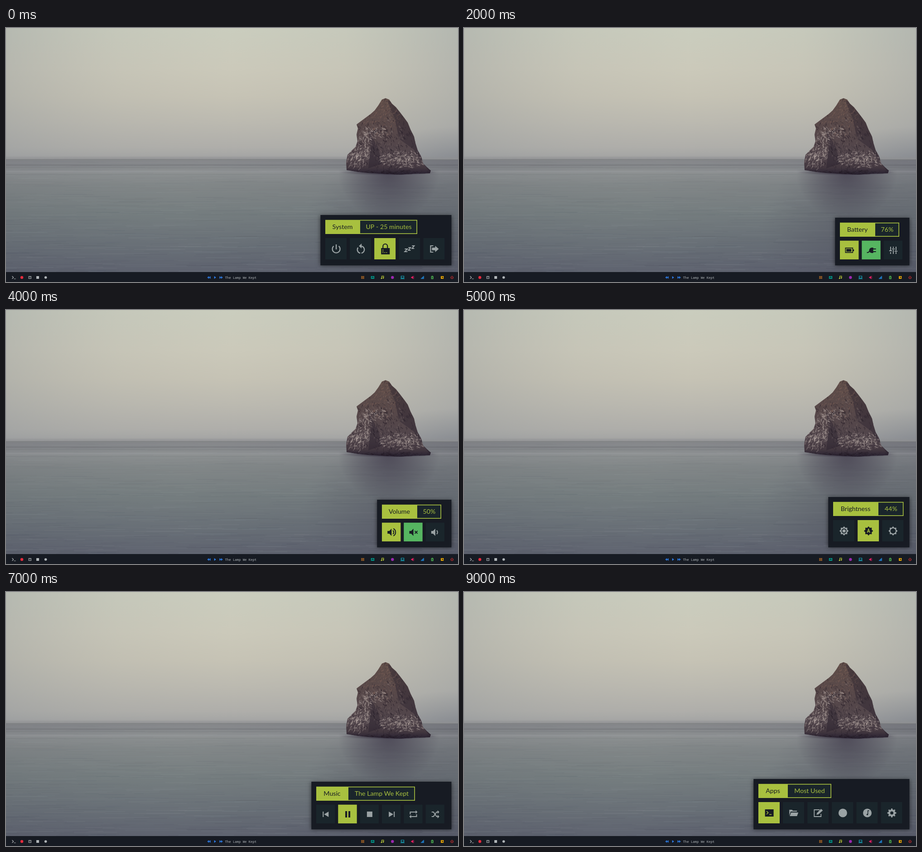
Recreate the animation shown at these times as an HTML page with a canvas. Size 998 px wide and 561 px high, loop 10000 ms.

```html
<!DOCTYPE html>
<html lang="en">
<head>
<meta charset="utf-8">
<title>Desktop applets</title>
<style>
html, body { margin: 0; width: 100%; height: 100%; overflow: hidden; background: #171b24; }
canvas { display: block; }
</style>
</head>
<body>
<canvas id="stage" width="998" height="561"></canvas>
<script>
const W = 998, H = 561, STEP = 1000;
const DARK = '#171b23', TILE = '#1a252b', LIME = '#a8c03f', GREEN = '#56b561', GREY = '#9aa2a4';
const ctx = document.getElementById('stage').getContext('2d');

function random(seed) {
  return () => {
    seed = (seed * 1664525 + 1013904223) >>> 0;
    return seed / 4294967296;
  };
}

function rect(g, x, y, w, h, fill) {
  g.fillStyle = fill;
  g.fillRect(x, y, w, h);
}

function fade(gradient, stops) {
  stops.forEach(([at, colour]) => gradient.addColorStop(at, colour));
  return gradient;
}

// soft elliptical patch of one colour
function glow(g, x, y, rx, ry, rgb, alpha) {
  g.save();
  g.translate(x, y);
  g.scale(rx, ry);
  rect(g, -1, -1, 2, 2, fade(g.createRadialGradient(0, 0, 0, 0, 0, 1), [
    [0, `rgba(${rgb},${alpha})`], [0.5, `rgba(${rgb},${alpha / 2})`], [1, `rgba(${rgb},0)`]
  ]));
  g.restore();
}

function text(g, value, x, y, colour, font, align = 'center') {
  g.font = font;
  g.textAlign = align;
  g.fillStyle = colour;
  g.fillText(value, x, y);
}

const circle = (r, x = 0, y = 0) => `M${x - r} ${y}a${r} ${r} 0 0 1 ${2 * r} 0a${r} ${r} 0 0 1 ${-2 * r} 0Z`;
const box = (x, y, w, h) => `M${x} ${y}h${w}v${h}h${-w}Z`;

function cog(teeth, outer, inner, flat) {
  let path = '';
  for (let i = 0; i < teeth; i++) {
    [[-1 + flat, inner], [-flat, outer], [flat, outer], [1 - flat, inner]].forEach(([k, r]) => {
      const a = (i + k / 2) * 2 * Math.PI / teeth - Math.PI / 2;
      path += `${path ? 'L' : 'M'}${(r * Math.cos(a)).toFixed(2)} ${(r * Math.sin(a)).toFixed(2)}`;
    });
  }
  return path + 'Z';
}

// fill, stroke (width w), and cut: strokes in the colour behind the icon
const SUN = cog(8, 10, 7.6, 0.08);
const SPEAKER = 'M-9 -3H-5L0 -8V8L-5 3H-9Z';
const ICONS = {
  power: { stroke: 'M-5.6 -6.3A8.5 8.5 0 1 0 5.6 -6.3M0 -10V1', w: 2.4 },
  restart: { stroke: 'M1 -6.4A8 8 0 0 1 1.5 9.4M-1 9.4A8 8 0 0 1 -6 -3', w: 2.4, fill: 'M2 -12V-1L-4 -6.5Z' },
  lock: { stroke: 'M-5 -1V-6A5 5 0 0 1 5 -6V-1', w: 2.2, fill: box(-9, -2, 19, 14), cut: 'M-6 2h2M-6 5h2M-6 8h2M-2 8h2M2 8h2' },
  sleep: { stroke: 'M-11 0h6l-6 6h6M-3 -3h5l-5 6h5M5 -7h5l-5 6h5', w: 2 },
  leave: { stroke: 'M-2 7H-8V-7H-2', w: 2.2, fill: 'M-5 -3H2V-7L10 0L2 7V3H-5Z' },
  battery: { stroke: box(-9, -5, 16, 10), w: 1.6, fill: box(-7, -3, 11, 6) + box(7.5, -2, 2.3, 4) },
  plug: { stroke: 'M-10 5Q-5 5 -4 1M3 -3H10M3 3H10', w: 2, fill: 'M4 -6V6H1A6 6 0 0 1 1 -6Z' },
  sliders: { stroke: 'M-6 -8V0M-9 1H-3M-6 4V8M0 -8V-5M-3 -3H3M0 -1V8M6 -8V0M3 2H9M6 4V8', w: 2 },
  wifi: { stroke: 'M-9 -2.5A13 13 0 0 1 9 -2.5M-5.5 1.5A8 8 0 0 1 5.5 1.5', w: 2.6, fill: 'M-3 4.5Q0 2 3 4.5L0 8Z' },
  gauge: { stroke: 'M-6.5 6.5A8.8 8.8 0 0 1 4 -7.4M8 -3A8.8 8.8 0 0 1 6.5 6.5', w: 2.4, fill: 'M6 -6L2.4 3A2.6 2.6 0 1 1 -2 0Z' },
  pencil: { fill: 'M-9 9L-8 4L3 -7L7 -3L-4 8ZM4.3 -8.3L6 -10L10 -6L8.3 -4.3Z' },
  server: { fill: box(-8, -10, 17, 6) + box(-8, -2, 17, 6), stroke: 'M0 4V8M-9 8.5H-3M3 8.5H9M-2 8.5H2', w: 2.2, cut: 'M-6 -7h2M-2 -7h2M-6 1h2M-2 1h2' },
  bright: { fill: SUN + circle(5.5) + circle(3.6) },
  auto: { fill: SUN, cut: 'M-3 4L0 -4L3 4M-2 1.5H2' },
  dim: { fill: SUN + circle(5.8) },
  monitor: { stroke: box(-9, -7, 18, 12), w: 1.6, fill: box(-4, 6, 8, 2.2) },
  crop: { stroke: 'M-5 -10V5H10M-10 -5H5V10', w: 2.2 },
  window: { stroke: box(-9, -8, 18, 16) + 'M-9 -4H9', w: 1.5, fill: box(-6, -7, 1.5, 2) + box(-3, -7, 1.5, 2) },
  terminal: { fill: box(-9.5, -8, 19, 16), cut: 'M-6 -4L-2.5 -0.5L-6 3M0 3.5H5' },
  folder: { fill: 'M-10 6V-7H-4L-2 -5H7V-3H-7ZM-9 7L-6 -1H10L7 7Z' },
  edit: { stroke: 'M3 -7H-9V8H6V2', w: 1.8, fill: 'M-4 4L-3 0L6 -9L10 -5.5L0.5 3Z' },
  song: { fill: circle(9.5), cut: 'M1.2 3.5V-5H4M-1 3.5a1 1 0 1 0 2 0a1 1 0 1 0 -2 0' },
  gear: { fill: cog(8, 10, 7.5, 0.26) + circle(3.5) },
  louder: { fill: SPEAKER, stroke: 'M3 -4A5 5 0 0 1 3 4M4 -8A9 9 0 0 1 4 8', w: 2 },
  mute: { fill: SPEAKER, stroke: 'M3 -3L9 3M9 -3L3 3', w: 2 },
  softer: { fill: SPEAKER, stroke: 'M3 -4A5 5 0 0 1 3 4', w: 2 },
  previous: { fill: box(-7, -6, 2, 12) + 'M6 -6V6L-4 0Z' },
  pause: { fill: box(-5.5, -7, 4, 14) + box(1.5, -7, 4, 14) },
  stop: { fill: box(-6, -6, 12, 12) },
  next: { fill: box(5, -6, 2, 12) + 'M-6 -6V6L4 0Z' },
  repeat: { stroke: 'M-7 0V-5H6M7 0V5H-6', w: 2, fill: 'M5 -9V-1L9 -5ZM-5 1V9L-9 5Z' },
  shuffle: { stroke: 'M-8 -5H-4L3 5H6M-8 5H-4L3 -5H6', w: 2, fill: 'M5 -9V-1L9 -5ZM5 1V9L9 5Z' },
  feed: { stroke: 'M-4 -4A8 8 0 0 1 4 4M-4 -0.5A4.5 4.5 0 0 1 0.5 4', w: 1.5, fill: circle(1.1, -3, 3) },
  square: { fill: box(-9, -9, 18, 18) },
  disc: { fill: circle(9.5) }
};

function icon(g, shape, x, y, colour, back) {
  g.save();
  g.translate(x, y);
  if (shape.fill) {
    g.fillStyle = colour;
    g.fill(new Path2D(shape.fill), 'evenodd');
  }
  if (shape.stroke) {
    g.strokeStyle = colour;
    g.lineWidth = shape.w;
    g.stroke(new Path2D(shape.stroke));
  }
  if (shape.cut) {
    g.strokeStyle = back;
    g.lineWidth = 1.5;
    g.stroke(new Path2D(shape.cut));
  }
  g.restore();
}

// x: left edge, mid / end: header divider and right edge, on: highlighted green tile
const PANELS = [
  { x: 694, tag: 'System', mid: 782, info: 'UP - 25 minutes', end: 908, pick: 2, tiles: 'power restart lock sleep leave' },
  { x: 705, tag: '04:20 PM', mid: 812, info: 'Friday, May', end: 918, pick: 1, wide: 79, tiles: '15 05 2020' },
  { x: 819, small: true, tag: 'Battery', mid: 908, info: '76%', end: 961, pick: 0, on: 1, tiles: 'battery plug sliders' },
  { x: 774, small: true, tag: 'Network', mid: 868, info: 'Online', end: 957, feed: true, pick: 1, on: 0, tiles: 'wifi gauge pencil server' },
  { x: 819, small: true, tag: 'Volume', mid: 908, info: '50%', end: 961, pick: 0, on: 1, tiles: 'louder mute softer' },
  { x: 804, tag: 'Brightness', mid: 915, info: '44%', end: 970.5, pick: 1, tiles: 'bright auto dim' },
  { x: 639, tag: 'Quick Links', mid: 756, info: 'Open In  :  Firefox', end: 894, pick: 0, tiles: 'disc square disc disc disc square' },
  { x: 674, small: true, tag: 'Music', mid: 756, info: 'The Lamp We Kept', end: 903, pick: 1, tiles: 'previous pause stop next repeat shuffle' },
  { x: 804, tag: 'Screenshot', mid: 914, pick: 1, tiles: 'monitor crop window' },
  { x: 639, tag: 'Apps', mid: 715, info: 'Most Used', end: 811, pick: 0, tiles: 'terminal folder edit disc song gear' }
];
const LABEL = '14.2px Lato, sans-serif';

function panel(g, p) {
  const y = p.small ? 419 : 413, left = p.x + 11, top = y + 10.8, head = p.info ? 31.2 : 28.2;
  g.save();
  g.shadowColor = 'rgba(0,0,0,.55)';
  g.shadowBlur = 9;
  g.shadowOffsetY = 1;
  rect(g, p.x + 0.3, y, 983.2 - p.x, 524.3 - y, DARK);
  g.restore();

  rect(g, left, top, (p.end || p.mid) - left, head, LIME);
  const base = top + head / 2 + 4.6;
  text(g, p.tag, (left + p.mid) / 2 - (p.info ? 0.5 : 0), base, DARK, LABEL);
  if (p.info) {
    rect(g, p.mid, top + 1.6, p.end - p.mid - 1.6, head - 3.2, TILE);
    text(g, p.info, (p.mid + p.end) / 2 + (p.feed ? 7 : 0), base, LIME, LABEL);
  }
  if (p.feed) icon(g, ICONS.feed, 886.5, 445.5, LIME);

  const size = p.small ? 41.4 : 47, wide = p.wide || size, pitch = wide + (p.small ? 6.9 : 7.1);
  const row = top + head + (p.small ? 8.7 : 9);
  p.tiles.split(' ').forEach((name, i) => {
    const x = left + i * pitch;
    const back = i === p.pick ? LIME : i === p.on ? GREEN : TILE;
    const colour = back === TILE ? GREY : DARK;
    rect(g, x, row, wide, size, back);
    const cx = x + wide / 2 + 0.6, cy = row + size / 2 + 0.5;
    if (ICONS[name]) icon(g, ICONS[name], cx, cy, colour, back);
    else text(g, name, cx, cy + 7, colour, '20px Lato, sans-serif');
  });
}

function sky(g) {
  rect(g, 0, 0, W, 300, fade(g.createLinearGradient(0, 0, 0, 300), [
    [0, '#cacdbe'], [0.3, '#cbc9ba'], [0.5, '#c6c3b5'], [0.7, '#bbb9b0'], [0.88, '#afaeaa'], [0.94, '#a6a6a5'], [1, '#96979a']
  ]));
  rect(g, 0, 0, W, 300, fade(g.createLinearGradient(0, 0, W, 0), [
    [0, 'rgba(145,150,153,.36)'], [0.25, 'rgba(160,162,160,.12)'], [0.5, 'rgba(170,170,165,0)'],
    [0.75, 'rgba(160,162,160,.1)'], [1, 'rgba(145,150,155,.4)']
  ]));
  glow(g, 1010, 292, 230, 75, '105,110,122', 0.4);
}

function sea(g) {
  rect(g, 0, 282, W, 258, fade(g.createLinearGradient(0, 282, 0, 540), [
    [0, 'rgba(145,146,148,0)'], [0.035, '#8d8e90'], [0.08, '#85878a'], [0.135, '#8f9293'],
    [0.25, '#828788'], [0.5, '#757d7f'], [0.75, '#697077'], [1, '#5d616e']
  ]));
  rect(g, 0, 291, W, 249, fade(g.createLinearGradient(0, 0, W, 0), [
    [0, 'rgba(75,80,92,.12)'], [0.4, 'rgba(120,130,130,.05)'], [0.7, 'rgba(70,72,88,.06)'], [1, 'rgba(60,62,80,.26)']
  ]));
  glow(g, 845, 440, 190, 150, '62,56,76', 0.22);
  const rnd = random(7);
  for (let i = 0; i < 900; i++) {
    const depth = rnd(), y = 292 + 246 * depth, len = 30 + 110 * rnd();
    const shade = rnd() < 0.5 ? '200,205,205' : '45,50,65';
    rect(g, rnd() * (W + 150) - 150, y, len, 0.5 + depth * 1.2, `rgba(${shade},${0.02 + 0.04 * rnd()})`);
  }
  [[290.5, 1.5, 0.24], [294.5, 1, 0.12], [302, 1.2, 0.22], [308, 1, 0.1], [323, 1, 0.1]].forEach(([y, h, a]) =>
    rect(g, 0, y, W, h, `rgba(55,58,65,${a})`));
  rect(g, 0, 315, W, 4, 'rgba(170,172,174,.14)');
}

function rock(g) {
  g.save();
  g.beginPath();
  g.rect(735, 313, 220, 120);
  g.clip();
  glow(g, 845, 318, 112, 105, '50,43,62', 0.62);
  g.restore();
  glow(g, 845, 319, 108, 6, '45,38,54', 0.9);

  g.save();
  g.clip(new Path2D('M838 155L846 158L852 167L861 175L869 185L879 198L887 209L893 224L901 240L904 254L909 270L917 284L921 299L930 308L938 315L936 321L900 322L870 324L830 322L800 320L780 318L752 314L751 296L754 280L766 268L772 262L776 250L774 235L777 222L774 213L782 207L805 190L814 182L822 171L830 158Z'));
  rect(g, 745, 150, 200, 180, fade(g.createLinearGradient(0, 155, 0, 322), [
    [0, '#5f4d48'], [0.4, '#574849'], [0.75, '#51454b'], [0.92, '#42373f'], [1, '#2b2433']
  ]));
  g.fillStyle = 'rgba(38,31,43,.4)';
  g.fill(new Path2D('M842 160L858 200L868 245L900 268L935 318L960 300L880 170ZM800 225L822 265L830 300L800 310L805 260Z'));

  // loose slanted strokes, densest at the middle of each patch
  const rnd = random(21);
  g.lineCap = 'round';
  const scuffs = (x, y, rx, ry, count, rgb, slant) => {
    for (let i = 0; i < count; i++) {
      const a = rnd() * 2 * Math.PI, r = Math.pow(rnd(), 0.7);
      const px = x + r * rx * Math.cos(a), py = y + r * ry * Math.sin(a);
      const turn = slant + rnd() * 1.4 - 0.7, len = 1 + 5 * rnd();
      g.strokeStyle = `rgba(${rgb},${0.15 + 0.4 * rnd()})`;
      g.lineWidth = 0.7 + 1.5 * rnd();
      g.beginPath();
      g.moveTo(px, py);
      g.lineTo(px + len * Math.cos(turn), py + len * Math.sin(turn));
      g.stroke();
    }
  };
  const PALE = '182,169,163', WARM = '126,98,88', DEEP = '36,28,38';
  scuffs(838, 240, 85, 85, 330, DEEP, 1.2);
  scuffs(832, 195, 42, 42, 160, WARM, 2.2);
  scuffs(840, 245, 40, 55, 90, '130,115,112', 1.2);
  scuffs(775, 283, 28, 28, 190, PALE, 2.2);
  scuffs(794, 250, 16, 34, 100, PALE, 1.3);
  scuffs(812, 230, 30, 14, 90, PALE, 0.4);
  scuffs(868, 290, 44, 18, 190, PALE, 2.6);
  scuffs(898, 290, 26, 20, 90, PALE, 0.9);
  scuffs(820, 228, 20, 5, 30, DEEP, 0.4);
  scuffs(845, 270, 75, 50, 130, DEEP, 1.2);
  scuffs(845, 320, 100, 6, 240, DEEP, 0);
  g.restore();
}

function bar(g) {
  rect(g, 0, 539, W, 22, DARK);
  const y = 551, mark = (x, colour, shape) => icon(g, shape, x, y, colour, DARK);
  const line = (stroke, w = 1.2, fill) => ({ stroke, w, fill });
  const solid = fill => ({ fill });
  const light = '#b0b5b8', blue = '#2f80ed';
  mark(17.5, light, line('M-4 -3L-1 0L-4 3M0 3H4'));
  mark(35, '#e42b3d', solid(circle(3.2)));
  mark(52.8, light, line(box(-2.5, -2.5, 5, 5) + 'M-1 -0.7H1', 1.1));
  mark(70, light, solid(box(-3, -3, 6, 6)));
  mark(87.6, light, solid(circle(2.8)));
  mark(448, blue, solid('M0 -3V3L-3.5 0ZM3.5 -3V3L0 0Z'));
  mark(461.5, blue, solid('M-1.8 -3V3L2.2 0Z'));
  mark(475, blue, solid('M-3.5 -3V3L0 0ZM0 -3V3L3.5 0Z'));
  text(g, 'The Lamp We Kept', 483.5, 553.6, light, '7.25px "Noto Sans Mono", monospace', 'left');

  let dots = '', bars = '';
  for (let i = 0; i < 9; i++) dots += box(-3 + (i % 3) * 2.3, -3 + Math.floor(i / 3) * 2.3, 1.5, 1.5);
  for (let i = 0; i < 4; i++) bars += box(-3.2 + i * 1.8, 1.5 - i * 1.6, 1.3, 1.8 + i * 1.6);
  mark(787.5, '#f08a24', solid(dots));
  mark(809.5, '#009688', { fill: box(-3.7, -3, 7.4, 6), cut: 'M-2 0.8L0 -1L2 0.8' });
  mark(831, '#cddc39', line('M-1.2 2V-3H2.8V1', 1.2, circle(1.3, -2, 2) + circle(1.3, 2, 1.2)));
  mark(853.3, '#9c27b0', solid(circle(3.2)));
  mark(875.5, '#16a9c0', line(box(-3, -3, 6, 4.3) + 'M-4.5 3H4.5'));
  mark(898, '#e91e63', line('M1.5 -2L3 -3M1.5 0H3.5M1.5 2L3 3', 1, 'M-3.5 -1.2H-2L1 -3.5V3.5L-2 1.2H-3.5Z'));
  mark(919.3, '#2196f3', solid(bars));
  mark(941.2, '#4caf50', { fill: box(-2.5, -2.7, 5, 6.2) + box(-1, -3.8, 2, 1.1), cut: 'M0 -1.4V2' });
  mark(963.2, '#ffb300', { fill: box(-3, -3, 6, 6), cut: 'M0 -2V0.5H2' });
  mark(984.8, '#d32f2f', line('M-1.8 -1.9A2.7 2.7 0 1 0 1.8 -1.9M0 -3.7V0.3', 1.1));
}

const desktop = document.createElement('canvas');
desktop.width = W;
desktop.height = H;
const scene = desktop.getContext('2d');
[sky, sea, rock, bar].forEach(draw => draw(scene));

let shown = -1;
function frame() {
  const step = Math.floor(performance.now() / STEP) % PANELS.length;
  if (step !== shown) {
    shown = step;
    ctx.drawImage(desktop, 0, 0);
    panel(ctx, PANELS[step]);
  }
  requestAnimationFrame(frame);
}
frame();
</script>
</body>
</html>
```
